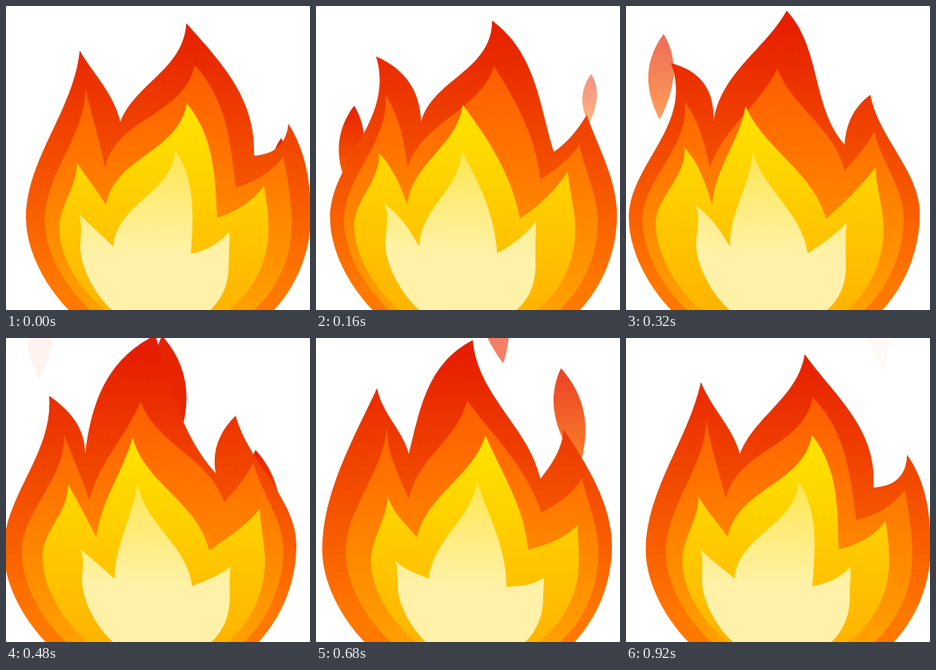
An HTML page with a canvas for the animation above (960 ms loop, 380x380 px).

```html
<!DOCTYPE html>
<html lang="en">
<head>
<meta charset="utf-8">
<title>Flame</title>
<style>
  html, body { margin: 0; height: 100%; overflow: hidden; background: #fff; }
  canvas { display: block; width: 100vw; height: 100vh; }
</style>
</head>
<body>
<canvas id="stage" width="380" height="380"></canvas>
<script>
const ctx = document.getElementById('stage').getContext('2d');
const LOOP = 960, STEP = 40;

// Sideways pull of the curve handles along the outline, in percent of each edge:
// leaning right, leaning left, upright. The three are blended over the loop.
const outerBends = [
  [-15, 11, 16, 10, -25, 15, 13, -20, -20, 7],
  [-20, 23, 25, 16, 11, 4, -13, 20, 20, -8],
  [5, -12, 5, 8, 17, -12, 12, -14, -20, 9]
];
const innerBends = [
  [-12, 5, 4, 17, -17, 12, 8, -9, -9, 0],
  [-15, 6, 3, 8, -3, -11, 13, -2, -5, -4],
  [-8, -12, -3, 14, -12, 5, 9, -8, -14, 2]
];

// Outline points from left bulge to right bulge: rest x, y, sway x, y, extra lag in ms.
// Inner layers swing earlier by `lead` ms.
const layers = [
  { lead: 5, bends: outerBends, fill: [20, '#e61e00', 350, '#ff7800'], points: [
    [11, 265, 14, 0], [73, 64, 21, -9, -60], [121, 145, 22, 0], [206, 9, 20, 13, 45],
    [286, 178, 24, 9], [320, 122, 33, 25, 15], [372, 260, 9, 2]] },
  { lead: 70, bends: innerBends, fill: [75, '#ff5c00', 380, '#ffa000'], points: [
    [34, 268, 16, 0], [86, 112, 15, -10], [114, 202, 11, 0], [202, 77, 34, -3, 90],
    [280, 216, 8, 12], [328, 172, 21, 18], [352, 268, 6, 4]] },
  { lead: 150, bends: innerBends, fill: [120, '#ffe400', 380, '#ffb400'], points: [
    [56, 276, 19, 4], [83, 189, 10, 12], [119, 249, 11, 0], [192, 123, 45, -2, 40],
    [259, 265, 9, -1], [320, 219, 8, 18, -40], [326, 279, 4, 0]] },
  { lead: 260, bends: innerBends, fill: [180, '#ffe650', 310, '#fff2a8'], points: [
    [94, 302, 8, 6], [92, 262, 7, 16], [135, 301, 6, 0], [188, 181, 31, -2, 150],
    [232, 310, 6, 1], [280, 284, 5, 16], [279, 325, 5, 0]] }
];

// Licks that break away: tip position at time `at`, speed in px/ms, length, lean, fade-out.
const licks = [
  { from: 80, at: 320, x: 47, y: 35, vx: -.004, vy: -.56, h: 107, lean: -5, end: 498, fade: 270 },
  { from: 0, at: 160, x: 344, y: 85, vx: 0, vy: -.5, h: 62, lean: -3, end: 260, fade: 200 },
  { from: 460, at: 760, x: 304, y: -3, vx: -.028, vy: -.51, h: 123, lean: 23, end: 930, fade: 295 },
  { from: 360, at: 480, x: 195, y: -3, vx: .08, vy: -.44, h: 123, lean: 23, end: 830, fade: 250,
    low: '#ea2c00' }
];

const wave = (t, peak) => Math.cos(2 * Math.PI * (t - peak) / LOOP);

function gradient(y0, c0, y1, c1) {
  const g = ctx.createLinearGradient(0, y0, 0, y1);
  g.addColorStop(0, c0);
  g.addColorStop(1, c1);
  return g;
}

function drawLayer({ lead, bends, fill, points }, t) {
  const pts = points.map(([x, y, sx, sy, lag = 0]) => {
    const s = wave(t, lag - lead);
    return [x + sx * s, y + sy * s];
  });
  const weights = [80, 400, 720].map(peak => (1 + 2 * wave(t, peak)) / 3);
  const pull = i => weights.reduce((sum, w, k) => sum + w * bends[k][i], 0) / 100;
  const [lx, ly] = pts[0], [rx, ry] = pts[6];

  ctx.beginPath();
  ctx.moveTo(lx, ly);
  for (let i = 0; i < 6; i++) {
    const [ax, ay] = pts[i], [bx, by] = pts[i + 1];
    const dx = bx - ax, dy = by - ay;
    const handle = (f, p) => [ax + dx * f + dy * p, ay + dy * f - dx * p];
    // The bulges at both ends keep vertical tangents.
    const h1 = i === 0 ? [ax, ay + dy * .35] : handle(1 / 3, pull(2 * i - 1));
    const h2 = i === 5 ? [bx, by - dy * .35] : handle(2 / 3, pull(2 * i));
    ctx.bezierCurveTo(...h1, ...h2, bx, by);
  }
  // Round base, mostly below the stage, slightly flatter on the left.
  const r = (rx - lx) / 2, k = r * .55, cx = lx + r, bottom = (ly + ry) / 2 + r * .98;
  ctx.bezierCurveTo(rx, ry + k, cx + k, bottom, cx, bottom);
  ctx.bezierCurveTo(cx - k, bottom, lx, ly + k * .75, lx, ly);
  ctx.fillStyle = gradient(...fill);
  ctx.fill();
}

function drawLick({ from, at, x, y, vx, vy, h, lean, end, fade, low = '#fc6c00' }, t) {
  if (t < from || t >= end) return;
  x += vx * (t - at);
  y += vy * (t - at);
  const mid = x + lean / 2;
  ctx.globalAlpha = Math.min(1, (end - t) / fade);
  ctx.beginPath();
  ctx.moveTo(x, y);
  ctx.quadraticCurveTo(mid + h * .28, y + h * .42, x + lean, y + h);
  ctx.quadraticCurveTo(mid - h * .31, y + h * .45, x, y);
  ctx.fillStyle = gradient(y, '#e62000', y + h, low);
  ctx.fill();
  ctx.globalAlpha = 1;
}

function frame() {
  const t = Math.floor(performance.now() % LOOP / STEP) * STEP;
  ctx.fillStyle = '#fff';
  ctx.fillRect(0, 0, 380, 380);
  licks.forEach(lick => drawLick(lick, t));
  layers.forEach(layer => drawLayer(layer, t));
  requestAnimationFrame(frame);
}
frame();
</script>
</body>
</html>
```
